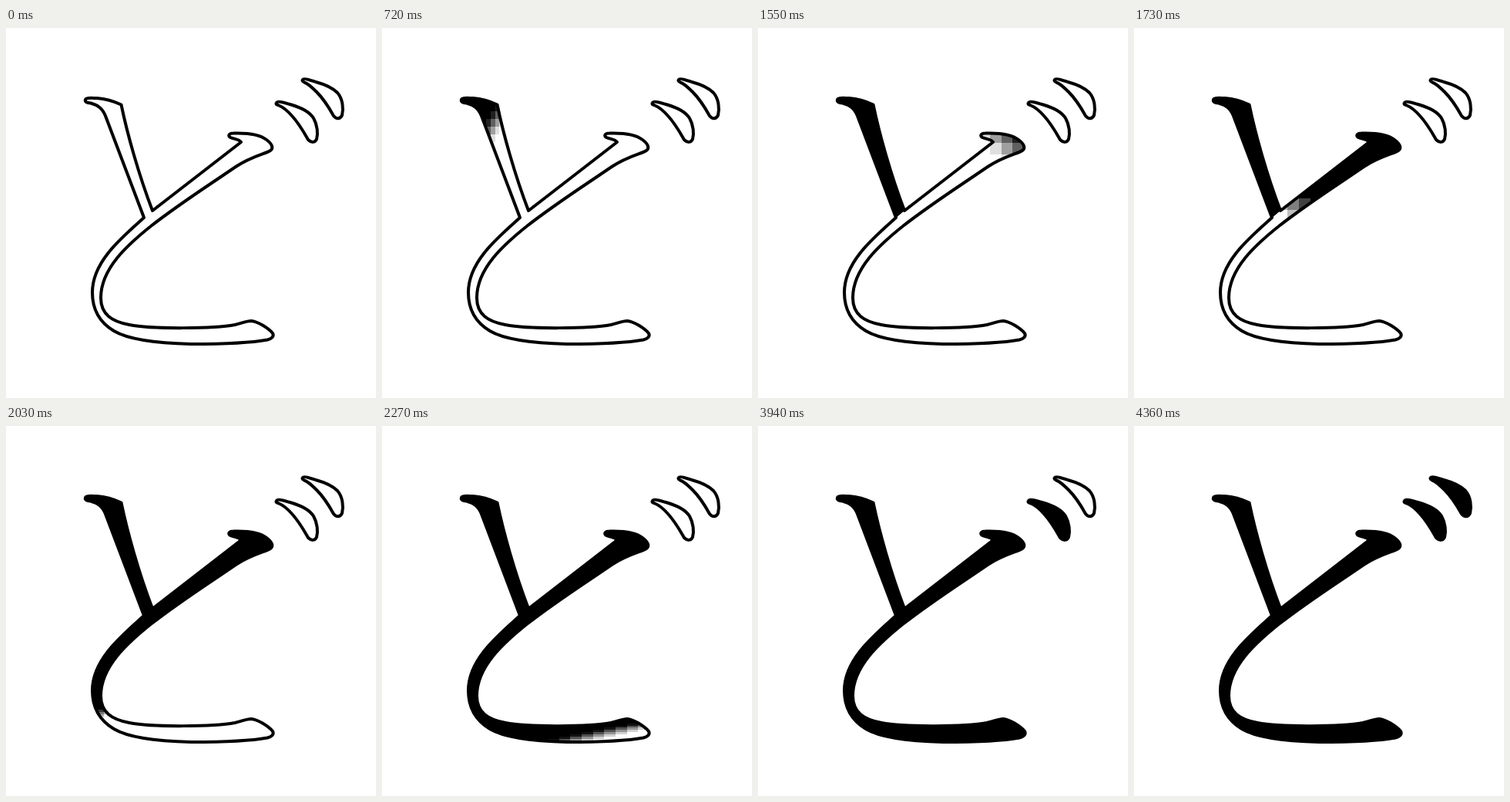
Write an HTML page with a canvas that moves like this. It is 480 px wide and 480 px high and loops after 4.82 s.

```html
<!DOCTYPE html>
<html>
<head>
<meta charset="utf-8">
<style>
html, body { margin: 0; width: 100%; height: 100%; overflow: hidden; background: #fff; }
canvas { display: block; }
</style>
</head>
<body>
<canvas width="480" height="480"></canvas>
<script>
const ctx = document.querySelector('canvas').getContext('2d');
const LOOP = 4820, STEP = 60, GRID = 16, SOFT = 0.25;

const body = new Path2D(`M103 93C104 90 112 91 118 91C130 92 142 96 149.5 99.5
  C157 136 172 190 190 237L305 148C302 144 297 144.500 291 142C287.500 140 289 136.500 295 136.500
  C310 136 328 137 338 145C346 151 347 156 343 159C337 163 319 166 298 180
  C266 202 225 228 188 257C158 281 123 312 123 350C123 372 138 381 160 385
  C190 391 270 390 297 385C306 383 312 380 318 380C326 380.500 340 389 346 396
  C348 400 345 403 339 404.500C315 409 270 410 240 410C200 409 160 405 140 393
  C118 380 112 360 112 343C112 303 150 272 179 246L129 114
  C125 104 119 100 110 97.500C105 97 102 96 103 93Z`);
const dot1 = new Path2D(`M351 97C352 94 362 97 370 99.500C382 103 394 109 399 117
  C404 126 405 137 403 144C401 149 396 149 392 145C388 138 381 125 371 114
  C364 106 358 102 353 100C350 99 350 98 351 97Z`);
const dot2 = new Path2D(`M385 67C386 64.500 396 68 402 70C413 73 424 78 430 84
  C437 92 438 105 436 113C434 118 429 119 425 114C420 105 414 94 403 83
  C397 77 392 72 387 70.500C384 69 384 68 385 67Z`);
const shortStroke = new Path2D('M90 80H160L198 230L177 248Z');

// Each wipe runs diagonally over its box [left, top, right, bottom].
const wipes = [
  { shape: body, within: shortStroke, start: 600, steps: 8, box: [101, 88, 192, 249] },
  { shape: body, start: 1550, steps: 8, box: [112, 135, 345, 365], fromRight: true },
  { shape: body, start: 2030, steps: 7, box: [112, 365, 347, 412] },
  { shape: dot1, start: 2990, steps: 8, box: [348, 94, 406, 151] },
  { shape: dot2, start: 3940, steps: 8, box: [382, 64, 440, 121] }
];

function drawWipe({ shape, within, start, steps, box: [l, t, r, b], fromRight }, time) {
  if (time < start) return;
  const step = Math.min(steps, Math.floor((time - start) / STEP) + 1);
  const lead = step / steps * (2 + SOFT);
  const atX = i => Math.round(l + (r - l) * i / GRID);
  const atY = j => Math.round(t + (b - t) * j / GRID);
  ctx.save();
  ctx.clip(shape);
  if (within) ctx.clip(within);
  for (let j = 0; j < GRID; j++) {
    for (let i = 0; i < GRID; i++) {
      const col = fromRight ? GRID - 1 - i : i;
      const alpha = (lead - (col + j + 1) / GRID) / SOFT;
      if (alpha <= 0) continue;
      ctx.globalAlpha = Math.min(1, alpha);
      ctx.fillRect(atX(i), atY(j), atX(i + 1) - atX(i), atY(j + 1) - atY(j));
    }
  }
  ctx.restore();
}

function draw(time) {
  ctx.fillStyle = '#fff';
  ctx.fillRect(0, 0, 480, 480);
  ctx.fillStyle = ctx.strokeStyle = '#000';
  ctx.lineWidth = 4;
  ctx.lineJoin = 'round';
  wipes.forEach(wipe => drawWipe(wipe, time));
  [body, dot1, dot2].forEach(path => ctx.stroke(path));
}

const origin = performance.now();
function tick() {
  draw((performance.now() - origin) % LOOP);
  requestAnimationFrame(tick);
}
tick();
</script>
</body>
</html>
```
